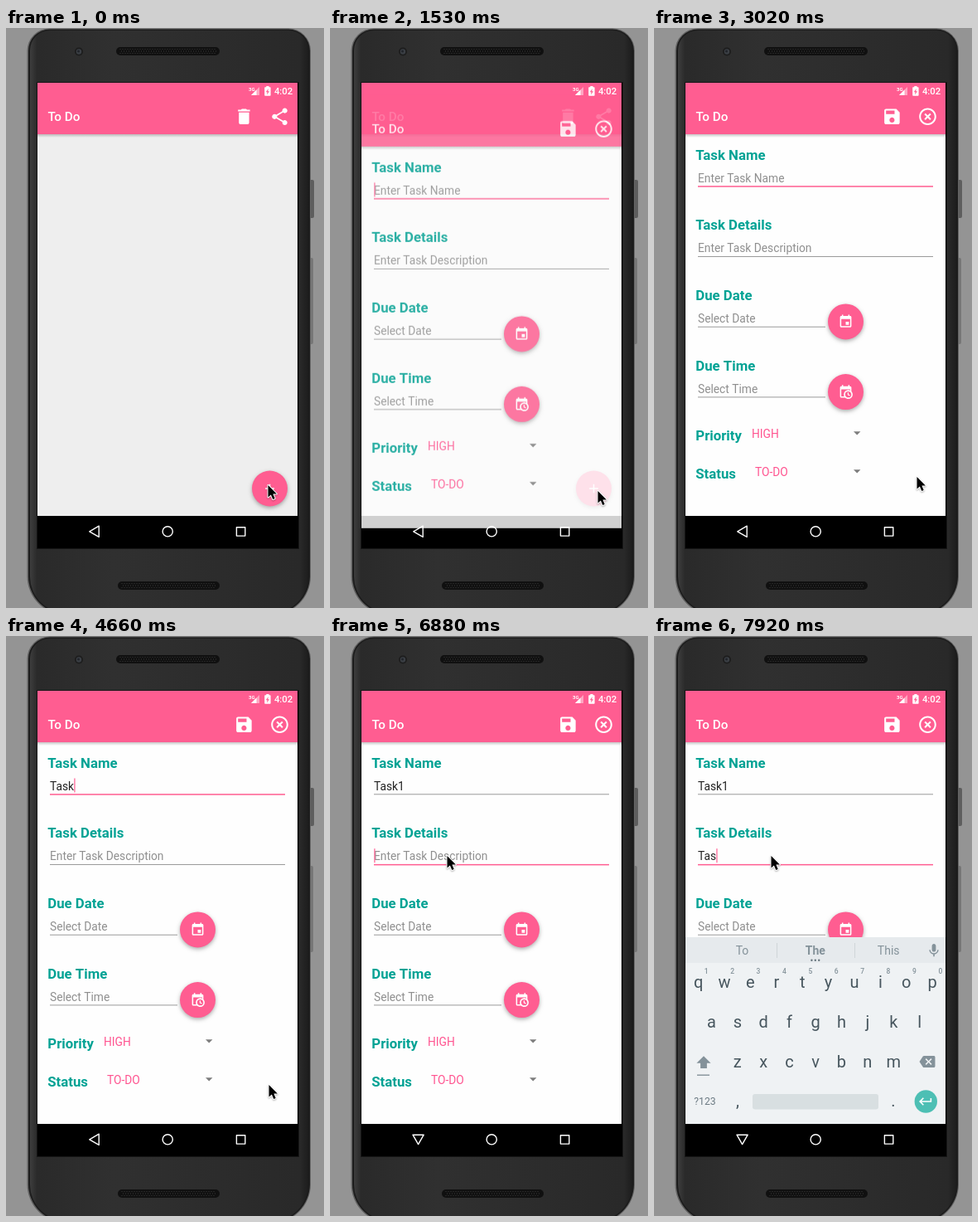
Animation, 384 px wide and 699 px high, one loop 8000 ms. Source, as an HTML page with a canvas:

```html
<!DOCTYPE html>
<html lang="en">
<head>
<meta charset="utf-8">
<title>To Do</title>
<style>
html, body { margin: 0; width: 100%; height: 100%; overflow: hidden; background: #949494; }
canvas { display: block; width: 384px; height: 699px; }
</style>
</head>
<body>
<canvas id="stage"></canvas>
<script>
const W = 384, H = 699, LOOP = 8000;
const PINK = '#ff5d91', TEAL = '#00a294', HINT = '#8f8f8f', KEY = '#47565e', KEY_DIM = '#84929a';
const dpr = window.devicePixelRatio || 1;

function prepare(canvas) {
  canvas.width = W * dpr;
  canvas.height = H * dpr;
  const c = canvas.getContext('2d');
  c.scale(dpr, dpr);
  return c;
}
const screen2d = prepare(document.getElementById('stage'));
const layer2d = prepare(document.createElement('canvas'));
let g = screen2d;

// Icons on a 24-unit grid
const ICON = {
  trash: 'M6 19c0 1.1.9 2 2 2h8c1.1 0 2-.9 2-2V7H6v12zM19 4h-3.5l-1-1h-5l-1 1H5v2h14V4z',
  share: 'M18 16.08c-.76 0-1.44.3-1.96.77L8.91 12.7c.05-.23.09-.46.09-.7s-.04-.47-.09-.7l7.05-4.11c.54.5 1.25.81 2.04.81 1.66 0 3-1.34 3-3s-1.34-3-3-3-3 1.34-3 3c0 .24.04.47.09.7L8.04 9.81C7.5 9.31 6.79 9 6 9c-1.66 0-3 1.34-3 3s1.34 3 3 3c.79 0 1.5-.31 2.04-.81l7.12 4.16c-.05.21-.08.43-.08.65 0 1.61 1.31 2.92 2.92 2.92s2.92-1.31 2.92-2.92-1.31-2.92-2.92-2.92z',
  save: 'M17 3H5c-1.11 0-2 .9-2 2v14c0 1.1.89 2 2 2h14c1.1 0 2-.9 2-2V7l-4-4zm-5 16c-1.66 0-3-1.34-3-3s1.34-3 3-3 3 1.34 3 3-1.34 3-3 3zm3-10H5V5h10v4z',
  close: 'M14.59 8L12 10.59 9.41 8 8 9.41 10.59 12 8 14.59 9.41 16 12 13.41 14.59 16 16 14.59 13.41 12 16 9.41 14.59 8zM12 2C6.47 2 2 6.47 2 12s4.47 10 10 10 10-4.47 10-10S17.53 2 12 2zm0 18c-4.41 0-8-3.59-8-8s3.59-8 8-8 8 3.59 8 8-3.59 8-8 8z',
  date: 'M17 12h-5v5h5v-5zM16 1v2H8V1H6v2H5c-1.11 0-1.99.9-1.99 2L3 19c0 1.1.89 2 2 2h14c1.1 0 2-.9 2-2V5c0-1.1-.9-2-2-2h-1V1h-2zm3 18H5V8h14v11z',
  time: 'M15,13H16.5V15.82L18.94,17.23L18.19,18.53L15,16.69V13M19,8H5V19H9.67C9.24,18.09 9,17.07 9,16A7,7 0 0,1 16,9C17.07,9 18.09,9.24 19,9.67V8M5,21C3.89,21 3,20.1 3,19V5C3,3.89 3.89,3 5,3H6V1H8V3H16V1H18V3H19A2,2 0 0,1 21,5V11.1C22.24,12.36 23,14.09 23,16A7,7 0 0,1 16,23C14.09,23 12.36,22.24 11.1,21H5M16,11.15A4.85,4.85 0 0,0 11.15,16C11.15,18.68 13.32,20.85 16,20.85A4.85,4.85 0 0,0 20.85,16C20.85,13.32 18.68,11.15 16,11.15Z',
  plus: 'M19 13h-6v6h-2v-6H5v-2h6V5h2v6h6v2z',
  mic: 'M12 14c1.66 0 2.99-1.34 2.99-3L15 5c0-1.66-1.34-3-3-3S9 3.34 9 5v6c0 1.66 1.34 3 3 3zm5.3-3c0 3-2.54 5.1-5.3 5.1S6.7 14 6.7 11H5c0 3.41 2.72 6.23 6 6.72V21h2v-3.28c3.28-.48 6-3.3 6-6.72h-1.7z',
  enter: 'M19 7v4H5.83l3.58-3.59L8 6l-6 6 6 6 1.41-1.41L5.83 13H21V7z',
  erase: 'M22 3H7c-.69 0-1.23.35-1.59.88L0 12l5.41 8.11c.36.53.9.89 1.59.89h15c1.1 0 2-.9 2-2V5c0-1.1-.9-2-2-2zm-3 12.59L17.59 17 14 13.41 10.41 17 9 15.59 12.59 12 9 8.41 10.41 7 14 10.59 17.59 7 19 8.41 15.41 12 19 15.59z',
  shift: 'M12 2L1 13h6v8h10v-8h6z',
  pointer: 'M0 0V14.6L3.4 11.5L5.8 17L8.2 16L5.9 10.6H10.4Z'
};
const PATH = {};
for (const name in ICON) PATH[name] = new Path2D(ICON[name]);

function icon(name, x, y, scale, color = '#fff') {
  g.save();
  g.translate(x, y);
  g.scale(scale, scale);
  g.translate(-12, -12);
  g.fillStyle = color;
  g.fill(PATH[name]);
  g.restore();
}
function rect(x, y, w, h, color) {
  g.fillStyle = color;
  g.fillRect(x, y, w, h);
}
function round(x, y, w, h, r, color) {
  g.fillStyle = color;
  g.beginPath();
  g.roundRect(x, y, w, h, r);
  g.fill();
}
function disc(x, y, r, color) {
  g.fillStyle = color;
  g.beginPath();
  g.arc(x, y, r, 0, 7);
  g.fill();
}
function poly(points, color) {
  g.fillStyle = color;
  g.beginPath();
  points.forEach(([x, y]) => g.lineTo(x, y));
  g.closePath();
  g.fill();
}
function text(str, x, y, size, color, weight = 400, align = 'left') {
  g.font = `${weight} ${size}px Roboto, sans-serif`;
  g.textAlign = align;
  g.fillStyle = color;
  g.fillText(str, x, y);
}
function gradient(x0, y0, x1, y1, ...stops) {
  const gr = g.createLinearGradient(x0, y0, x1, y1);
  stops.forEach(([p, c]) => gr.addColorStop(p, c));
  return gr;
}

function fab(y, x, name, scale = 0.765) {
  g.save();
  g.shadowColor = 'rgba(0,0,0,.32)';
  g.shadowBlur = 5 * dpr;
  g.shadowOffsetY = 2 * dpr;
  disc(x, y, 21.5, PINK);
  g.restore();
  icon(name, x, y, scale);
}

// Latest entry whose time has come
function at(steps, t) {
  let hit = steps[0];
  for (const s of steps) if (s[0] <= t) hit = s;
  return hit;
}

const POINTER = [
  [0, 316, 551], [500, 318, 536], [650, 321, 520], [790, 322, 544], [940, 323, 558],
  [1820, 322, 552], [1970, 319, 545], [2120, 317, 541],
  [6000, 305, 520], [6140, 264, 452], [6290, 206, 362], [6440, 160, 290], [6580, 141, 265]
];
const NAME = [[0, ''], [3770, 'T'], [4070, 'Ta'], [4210, 'Tas'], [4660, 'Task'], [5410, 'Task1']];
const DETAILS = [[0, ''], [7630, 'T'], [7780, 'Ta'], [7920, 'Tas']];
const CARET = [
  [0, 1], [2120, 0], [2570, 1], [3020, 0], [3470, 1], [5260, 0], [5410, 1],
  [5850, 0], [6440, 1], [7330, 0], [7630, 1]
];
const FORM_IN = [[0, 0, 0], [1530, 0.82, 14.8], [1680, 1, 0.6], [1820, 1, 0]];
const KEYS_IN = [[0, 0, 0], [7180, 0.9, 2], [7330, 1, 0]];
const FOCUS_DETAILS = 6730, BACK_DOWN = 6880, SUGGEST = 7630;

function speaker(x, y, w) {
  round(x, y, w, 10, 5, '#101010');
  for (let row = 0; row < 3; row++)
    for (let i = 0; i < w / 3 - 3; i++)
      rect(x + 4.5 + i * 3 + (row % 2) * 1.5, y + 2 + row * 2.5, 1, 1, '#3a3a3a');
}

function phone() {
  rect(0, 0, W, H, '#949494');
  round(366, 183, 6, 46, 2, '#5e5e5e');
  round(366, 277, 5, 104, 2, '#777');
  round(25.5, 0.5, 342.5, 707, [27, 27, 47, 47], '#626262');
  round(27, 1.5, 340, 705, [26, 26, 46, 46], '#1c1c1c');
  round(29, 3, 336, 702, [24, 24, 44, 44],
    gradient(29, 0, 365, 0, [0, '#3d3d3d'], [0.025, '#2a2a2a'], [0.3, '#303030'], [0.97, '#292929'], [1, '#1d1d1d']));
  disc(88, 28.5, 5, '#1d1d1d');
  disc(88, 28.5, 3.2, '#3b3f45');
  disc(87.5, 28, 1.5, '#20242a');
  speaker(133, 23, 125);
  speaker(135, 667, 123);
  rect(37, 65, 317, 563, '#161616');
  rect(38, 66, 315, 561, '#000');
}

function statusBar() {
  text('3G', 293, 75.5, 6, '#fff', 700);
  poly([[296, 81], [306, 71], [306, 81]], 'rgba(255,255,255,.45)');
  poly([[296, 81], [302.5, 74.5], [302.5, 81]], '#fff');
  rect(314.3, 70, 3.2, 2, '#fff');
  round(312.2, 71.2, 7.4, 10.6, 0.8, '#fff');
  poly([[316.8, 73], [313.8, 77.2], [315.6, 77.2], [315, 80.4], [318, 76.2], [316.2, 76.2]], PINK);
  text('4:02', 346.2, 80, 11.3, '#fff', 500, 'right');
}

function navBar(t) {
  g.strokeStyle = '#fff';
  g.lineWidth = 1.4;
  g.lineJoin = 'round';
  g.save();
  g.translate(106.6, 606.8);
  if (t >= BACK_DOWN) g.rotate(-Math.PI / 2);
  g.beginPath();
  [[-5.8, 0], [5.6, -6.6], [5.6, 6.6]].forEach(([x, y]) => g.lineTo(x, y));
  g.closePath();
  g.stroke();
  g.restore();
  g.beginPath();
  g.arc(195.2, 606.8, 6.1, 0, 7);
  g.stroke();
  g.strokeRect(278.4, 601.7, 10.4, 10.4);
}

function appBar(left, right) {
  rect(38, 128, 314, 4, gradient(0, 128, 0, 132, [0, 'rgba(0,0,0,.22)'], [1, 'rgba(0,0,0,0)']));
  rect(38, 66, 314, 62, PINK);
  text('To Do', 50.4, 112.3, 15.3, '#fff', 500);
  icon(left, 287.4, 106.8, 1.03);
  icon(right, 330.5, 106.8, 1.03);
}

function listView() {
  rect(38, 128, 314, 460, '#eee');
  appBar('trash', 'share');
  fab(555, 318.5, 'plus');
}

function field(label, hint, y, right, value, focused, caret) {
  text(label, 50.3, y, 16.8, TEAL, 700);
  text(value || hint, 53, y + 27, 13.77, value ? '#222' : HINT);
  if (focused) {
    rect(53, y + 31.7, right - 53, 1.5, PINK);
    if (caret) rect(53.3 + g.measureText(value).width, y + 13, 1.2, 17, PINK);
  } else {
    rect(53, y + 31.8, right - 53, 1, '#9b9b9b');
  }
}

function spinner(label, value, x, y) {
  text(label, 50.3, y, 16.8, TEAL, 700);
  text(value, x, y - 3.5, 13.77, '#ff5490');
  poly([[241, y - 11.2], [249.4, y - 11.2], [245.2, y - 6.8]], '#7d7d7d');
}

function formView(t) {
  const second = t >= FOCUS_DETAILS, caret = at(CARET, t)[1];
  rect(38, 128, 314, 460, '#fefefe');
  appBar('save', 'close');
  field('Task Name', 'Enter Task Name', 158.5, 337, at(NAME, t)[1], !second, caret);
  field('Task Details', 'Enter Task Description', 243.2, 337, at(DETAILS, t)[1], second, caret);
  field('Due Date', 'Select Date', 327.9, 207, '', false);
  field('Due Time', 'Select Time', 412.6, 207, '', false);
  fab(353.9, 231.5, 'date');
  fab(438.6, 231.5, 'time');
  spinner('Priority', 'HIGH', 118, 497.4);
  spinner('Status', 'TO-DO', 122, 543.4);
}

function keyRow(keys, x, y) {
  [...keys].forEach((k, i) => text(k, x + i * 31.4, y, 20, KEY, 400, 'center'));
}

function keyboard(t) {
  rect(38, 363, 314, 225, '#eff2f4');
  rect(38, 363, 314, 31, '#e6eaed');
  rect(148, 370, 1, 18, '#d0d6d9');
  rect(242, 370, 1, 18, '#d0d6d9');
  if (t >= SUGGEST) {
    text('To', 106.5, 384, 14, KEY_DIM, 400, 'center');
    text('The', 194.8, 384, 14, KEY_DIM, 700, 'center');
    text('This', 283.2, 384, 14, KEY_DIM, 400, 'center');
    for (let i = -1; i < 2; i++) disc(194.8 + i * 4.4, 390.8, 1.2, '#66757d');
  }
  icon('mic', 338, 379, 0.8, KEY_DIM);
  keyRow('qwertyuiop', 53.6, 424);
  for (let i = 0; i < 10; i++)
    text(String((i + 1) % 10), 63.2 + i * 31.4, 407, 8.5, KEY_DIM, 500, 'center');
  keyRow('asdfghjkl', 69.4, 472);
  keyRow('zxcvbnm', 100.8, 520);
  icon('shift', 60, 514, 0.78, KEY_DIM);
  rect(52, 528.5, 15, 1.4, KEY_DIM);
  icon('erase', 330, 513, 0.79, KEY_DIM);
  text('?123', 61.5, 565.3, 12.2, '#6b7a82', 400, 'center');
  text(',', 101, 567, 20, KEY, 400, 'center');
  round(119, 552, 152, 18.5, 3, '#d8dfe1');
  text('.', 289, 567, 20, KEY, 400, 'center');
  disc(328.3, 561, 13.7, '#4dbfb4');
  icon('enter', 328, 561, 0.8);
}

// Draws a whole view as one translucent, shifted sheet
function sheet([, alpha, dy], draw, t) {
  if (!alpha) return;
  g = layer2d;
  g.clearRect(0, 0, W, H);
  draw(t);
  g = screen2d;
  g.save();
  g.beginPath();
  g.rect(38, 66, 314, 561);
  g.clip();
  g.globalAlpha = alpha;
  g.drawImage(layer2d.canvas, 0, dy, W, H);
  g.restore();
}

function pointer(t) {
  const [, x, y] = at(POINTER, t);
  g.save();
  g.translate(x + 0.5, y);
  g.shadowColor = 'rgba(0,0,0,.3)';
  g.shadowBlur = 2 * dpr;
  g.shadowOffsetY = dpr;
  g.strokeStyle = '#fff';
  g.lineWidth = 2;
  g.stroke(PATH.pointer);
  g.shadowColor = 'transparent';
  g.fillStyle = '#000';
  g.fill(PATH.pointer);
  g.restore();
}

function frame(t) {
  phone();
  if (t < 1680) listView();
  else rect(38, 66, 314, 62, PINK);
  sheet(at(FORM_IN, t), formView, t);
  sheet(at(KEYS_IN, t), keyboard, t);
  statusBar();
  navBar(t);
  pointer(t);
}

const start = performance.now();
function tick() {
  frame((performance.now() - start) % LOOP);
  requestAnimationFrame(tick);
}
tick();
</script>
</body>
</html>
```
